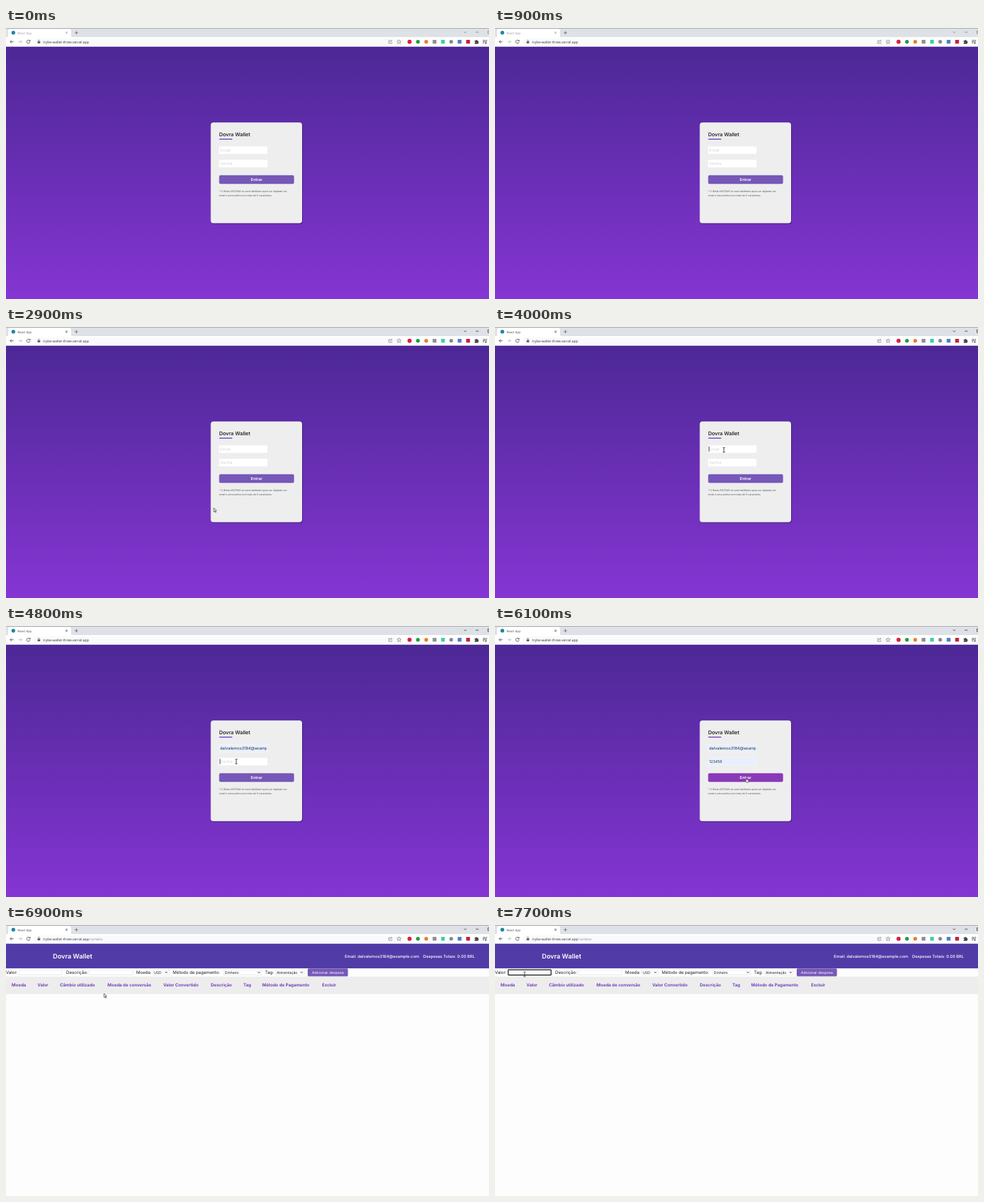
Animation of 690 by 388 pixels, one loop 8 s. Source, as an HTML page:

```html
<!DOCTYPE html>
<html lang="pt-BR">
<head>
<meta charset="utf-8">
<title>Carteira</title>
<style>
html, body { margin: 0; width: 100%; height: 100%; overflow: hidden; background: #fdfdfd; }
svg { display: block; width: 100vw; height: 100vh; }
text { font-family: Inter, "Open Sans", sans-serif; text-rendering: geometricPrecision; white-space: pre; }
.ui { font-family: "Open Sans", "Noto Sans", sans-serif; }
.line { fill: none; stroke: #5f6368; stroke-width: .8; }
.hint { font-size: 5.9px; fill: #d5d5de; }
.value { font-size: 5.76px; fill: #2b2f3a; }
.note { font-size: 3.5px; fill: #555; }
.label { font-size: 6.15px; fill: #161616; }
.option { font-size: 5.05px; fill: #111; }
.head { font-size: 6.2px; font-weight: 600; fill: #6b2fb8; }
.info { font-size: 5.8px; font-weight: 500; fill: #fff; }
.box { fill: #fff; stroke: #dedede; stroke-width: .6; }

/* One shared 8 s clock; 1.25% is 100 ms. */
.a { animation: 8s step-end infinite; }
.tab { animation-name: tab; }
.login { animation-name: login; }
.wallet { animation-name: wallet; }
.mail { animation-name: mail; }
.mail-caret { animation-name: mail-caret; }
.pass { animation-name: pass; }
.pass-caret { animation-name: pass-caret; }
.enter { animation-name: enter; }
.focus { animation-name: focus; }
.cursor { animation-name: move; }
.arrow { animation-name: arrow; }
.beam { animation-name: beam; }
.hand { animation-name: hand; }

@keyframes tab { 0% { opacity: .55 } 32.5%, 100% { opacity: 1 } }
@keyframes login { 0% { visibility: visible } 77.5%, 100% { visibility: hidden } }
@keyframes wallet { 0% { visibility: hidden } 77.5%, 100% { visibility: visible } }
@keyframes mail { 0% { opacity: 0 } 52.5%, 100% { opacity: 1 } }
@keyframes mail-caret { 0% { opacity: 0 } 48.75% { opacity: 1 } 55%, 100% { opacity: 0 } }
@keyframes pass { 0% { opacity: 0 } 65%, 100% { opacity: 1 } }
@keyframes pass-caret { 0% { opacity: 0 } 60% { opacity: 1 } 67.5%, 100% { opacity: 0 } }
@keyframes enter { 0% { fill: #7658b8 } 71.25%, 100% { fill: #8a3ab9 } }
@keyframes focus { 0% { opacity: 0 } 91.25%, 100% { opacity: 1 } }
@keyframes arrow {
  0% { opacity: 0 } 26.25% { opacity: 1 } 41.25% { opacity: 0 } 51.25% { opacity: 1 }
  56.25% { opacity: 0 } 65% { opacity: 1 } 71.25% { opacity: 0 } 77.5% { opacity: 1 }
  90%, 100% { opacity: 0 }
}
@keyframes beam {
  0% { opacity: 0 } 41.25% { opacity: 1 } 51.25% { opacity: 0 } 56.25% { opacity: 1 }
  65% { opacity: 0 } 90%, 100% { opacity: 1 }
}
@keyframes hand { 0% { opacity: 0 } 71.25% { opacity: 1 } 77.5%, 100% { opacity: 0 } }
@keyframes move {
  0% { transform: translate(254.3px, 363.2px) }
  35% { transform: translate(276px, 308px) }
  36.25% { transform: translate(296.8px, 259px) }
  37.5% { transform: translate(309px, 222px) }
  38.75% { transform: translate(318px, 196px) }
  40% { transform: translate(324px, 182px) }
  41.25% { transform: translate(327px, 174px) }
  45% { transform: translate(327px, 173px) }
  50% { transform: translate(327px, 176px) }
  51.25% { transform: translate(328px, 182px) }
  52.5% { transform: translate(328px, 186px) }
  56.25% { transform: translate(329px, 192px) }
  57.5% { transform: translate(329px, 194px) }
  65% { transform: translate(329px, 209px) }
  71.25% { transform: translate(337px, 212px) }
  72.5% { transform: translate(346px, 214.5px) }
  73.75% { transform: translate(354px, 216.5px) }
  75% { transform: translate(358.3px, 216.7px) }
  81.25% { transform: translate(348px, 206px) }
  82.5% { transform: translate(320px, 185px) }
  83.75% { transform: translate(270px, 155px) }
  85% { transform: translate(205px, 122px) }
  86.25% { transform: translate(140px, 98px) }
  87.5% { transform: translate(90px, 82px) }
  88.75% { transform: translate(58px, 74px) }
  90% { transform: translate(44px, 70.5px) }
  96.25%, 100% { transform: translate(42.3px, 70.5px) }
}
</style>
</head>
<body>
<svg viewBox="0 0 690 388" preserveAspectRatio="none">
  <defs>
    <linearGradient id="sky" x2="0" y2="1">
      <stop stop-color="#4d2896"/>
      <stop offset="1" stop-color="#8535d3"/>
    </linearGradient>
    <clipPath id="field"><path d="M304 168h68.5v34H304z"/></clipPath>
    <path id="chevron" d="M-1.6-.8 0 .8 1.6-.8" fill="none" stroke="#222" stroke-width=".9"/>
  </defs>

  <!-- Browser bar -->
  <path d="M0 0h690v14H0z" fill="#dee1e6"/>
  <path d="M0 0h690v.8H0z" fill="#9a9da2"/>
  <path d="M1 13.5q2 0 2-2V4q0-2.5 2.5-2.5h85Q93 1.5 93 4v7.500q0 2 2 2z" fill="#fff"/>
  <path d="M0 13h690v14H0z" fill="#fff"/>
  <rect x="40" y="14.800" width="528" height="10.400" rx="5.200" fill="#f9fafb"/>
  <circle cx="10.500" cy="6.800" r="2.700" fill="#1f86a6"/>
  <g class="a tab">
    <text class="ui" x="16.500" y="8.500" font-size="4.300" fill="#45484d">React App</text>
    <path d="M85.200 5.500l2.600 2.600m0-2.600l-2.600 2.600M654.300 5.200l1.700 1.700 1.700-1.700M671 6h4.200M690 4h-1.500v4H690" class="line" style="stroke:#33363a"/>
  </g>
  <path d="M98.300 6.800h4.600m-2.300-2.300v4.600" class="line"/>
  <path d="M10.800 19.700H6m2.200-2.300L5.900 19.700 8.200 22" class="line" style="stroke:#44474b"/>
  <path d="M17.700 19.700h4.800m-2.200-2.300 2.300 2.300-2.300 2.300" class="line" style="stroke:#b5b8bb"/>
  <path d="M34.100 18.500a2.400 2.400 0 1 0 .3 1.700M34.400 17v1.800h-1.800" class="line" style="stroke:#44474b"/>
  <path d="M45.200 19.200h3.600v2.700h-3.600z" fill="#55585c"/>
  <path d="M46 19.200v-1a1 1 0 0 1 2 0v1" class="line" style="stroke-width:.6"/>
  <text class="ui" x="53" y="21.500" font-size="4.930" fill="#2c2e31">trybe-wallet-three.vercel.app<tspan class="a wallet" fill="#85898d">/carteira</tspan></text>

  <path d="M549 18h-2.200v4h4.400v-1.500M548.500 20.200q.5-2 2.800-2m-1-1.200 1.200 1.200-1.200 1.200" class="line" style="stroke-width:.6"/>
  <path d="M561.500 16.800l.9 1.900 2 .2-1.500 1.400.5 2.100-1.900-1.100-1.900 1.100.5-2.100-1.500-1.400 2-.2z" class="line" style="stroke-width:.6"/>
  <circle cx="576.500" cy="19.700" r="3" fill="#d9233a"/>
  <circle cx="588.500" cy="19.700" r="2.700" fill="#1f9d45"/>
  <circle cx="600.300" cy="19.700" r="2.700" fill="#ef7b2d"/>
  <rect x="609.500" y="17" width="5.400" height="5.400" fill="#8d9094"/>
  <rect x="621.600" y="17" width="5.200" height="5.400" fill="#35d3a0"/>
  <circle cx="636" cy="19.700" r="2.600" fill="#85898d"/>
  <rect x="645.300" y="17" width="5.400" height="5.400" fill="#4b7fd1"/>
  <rect x="657.400" y="17" width="5.400" height="5.400" fill="#c91f37"/>
  <path d="M669.500 18h1.500a1 1 0 0 1 2 0h1.500v1.500a1 1 0 0 1 0 2v1.200h-5v-1.500a.8.8 0 0 0 0-1.700z" fill="#44474b"/>
  <path d="M681 17.700h4m-4 1.800h4m-4 1.800h2.200M686 21.500v-4h1.300" class="line" style="stroke:#44474b"/>
  <circle cx="685.300" cy="21.700" r="1" fill="#44474b"/>

  <!-- Login page -->
  <g class="a login">
    <path d="M0 26.700h690V388H0z" fill="url(#sky)"/>
    <rect x="293.500" y="136.300" width="130.500" height="144.400" rx="4" fill="#25104f" opacity=".5"/>
    <rect x="292.500" y="135.200" width="130.500" height="144.300" rx="4" fill="#eeeeef"/>
    <text x="304.500" y="155.200" font-size="7.350" font-weight="500" fill="#111">Dovra Wallet</text>
    <path d="M304.700 158.500h18.500v1.300h-18.500z" fill="#6a35c2"/>

    <path d="M304.500 169.500h69v10.800h-69zm0 19.300h69v10.600h-69z" fill="#fff"/>
    <text class="hint" x="305.700" y="177">Email</text>
    <text class="hint" x="306" y="196.200">Senha</text>
    <g class="a mail">
      <path d="M304.500 169.500h69v10.800h-69z" fill="#e8f0fe"/>
      <text class="value" x="305.800" y="177" clip-path="url(#field)">dalvalemos3184@example.com</text>
    </g>
    <g class="a pass">
      <path d="M304.500 188.800h69v10.600h-69z" fill="#e8f0fe"/>
      <text class="value" x="305.800" y="196.200" style="font-size:5.400px">123456</text>
    </g>
    <path class="a mail-caret" d="M305.500 171h.7v7.500h-.7z"/>
    <path class="a pass-caret" d="M305.500 190.300h.7v7.500h-.7z"/>

    <rect class="a enter" x="304.500" y="210.700" width="107" height="12.600" rx="2"/>
    <text x="358" y="219" font-size="5.600" font-weight="600" fill="#fff" text-anchor="middle">Entrar</text>
    <text class="note" x="304.500" y="234.700">* O Botão ENTRAR só será habilitado após ser digitado um</text>
    <text class="note" x="304.500" y="240.900">email e uma senha com mais de 6 caracteres.</text>
  </g>

  <!-- Wallet page -->
  <g class="a wallet">
    <path d="M0 26.700h690V388H0z" fill="#fdfdfd"/>
    <path d="M0 26.700h690v35.500H0z" fill="#513ca7"/>
    <text x="67" y="47.600" font-size="9.200" font-weight="600" fill="#fff">Dovra Wallet</text>
    <text class="info" x="484" y="46.600">Email: dalvalemos3184@example.com</text>
    <text class="info" x="596" y="46.600">Despesas Totais: 0.00 BRL</text>

    <path d="M0 62.200h690v11.500H0z" fill="#fff"/>
    <text class="label" x="0" y="69.600">Valor:</text>
    <text class="label" x="86" y="69.600">Descrição:</text>
    <text class="label" x="186" y="69.600">Moeda:</text>
    <text class="label" x="238.300" y="69.600">Método de pagamento:</text>
    <text class="label" x="370" y="69.600">Tag:</text>
    <path class="box" d="M18.800 64.200h61.200v7.300H18.800zm100 0H181v7.300h-62.200zm91 0h23.400v7.300h-23.400zm101.500 0h53.700v7.300h-53.700zm74 0H426v7.300h-40.700z"/>
    <rect class="a focus" x="18.900" y="64.100" width="61.200" height="7.600" rx=".6" fill="#fff" stroke="#111" stroke-width="1.200"/>
    <text class="option" x="211.300" y="69.700">USD</text>
    <text class="option" x="312.800" y="69.700">Dinheiro</text>
    <text class="option" x="386.700" y="69.700">Alimentação</text>
    <use href="#chevron" x="229" y="67.800"/>
    <use href="#chevron" x="361.300" y="67.800"/>
    <use href="#chevron" x="422.300" y="67.800"/>
    <path d="M0 73.700h690v25.200H0z" fill="#ededed"/>
    <rect x="431" y="62.300" width="57.500" height="11.200" rx="1.500" fill="#7658b8"/>
    <text x="459.800" y="69.600" font-size="5.200" fill="#fff" text-anchor="middle">Adicionar despesa</text>

    <g class="head">
      <text x="8" y="88.400">Moeda</text>
      <text x="45" y="88.400">Valor</text>
      <text x="77" y="88.400">Câmbio utilizado</text>
      <text x="145" y="88.400">Moeda de conversão</text>
      <text x="224.700" y="88.400">Valor Convertido</text>
      <text x="292.500" y="88.400">Descrição</text>
      <text x="339" y="88.400">Tag</text>
      <text x="366" y="88.400">Método de Pagamento</text>
      <text x="451.500" y="88.400">Excluir</text>
    </g>
  </g>

  <!-- Pointer -->
  <g class="a cursor" stroke="#111" stroke-width=".6">
    <path class="a arrow" d="M0 0v5.600l1.300-1.200 1 2.200.9-.4-1-2.200h1.800z" fill="#fff"/>
    <path class="a beam" d="M-1.500-3.300h1.100L0-3l.4-.3h1.100M0-3v6M-1.500 3.300h1.100L0 3l.4.300h1.100" fill="none" stroke-width=".8"/>
    <path class="a hand" d="M.3.700q.6-.7 1.100 0v2.200l2 .5q.7.200.6 1L3.600 7H.9L-.8 4.700q0-.8.600-.7l.5.500z" fill="#fff"/>
  </g>
</svg>
</body>
</html>
```
